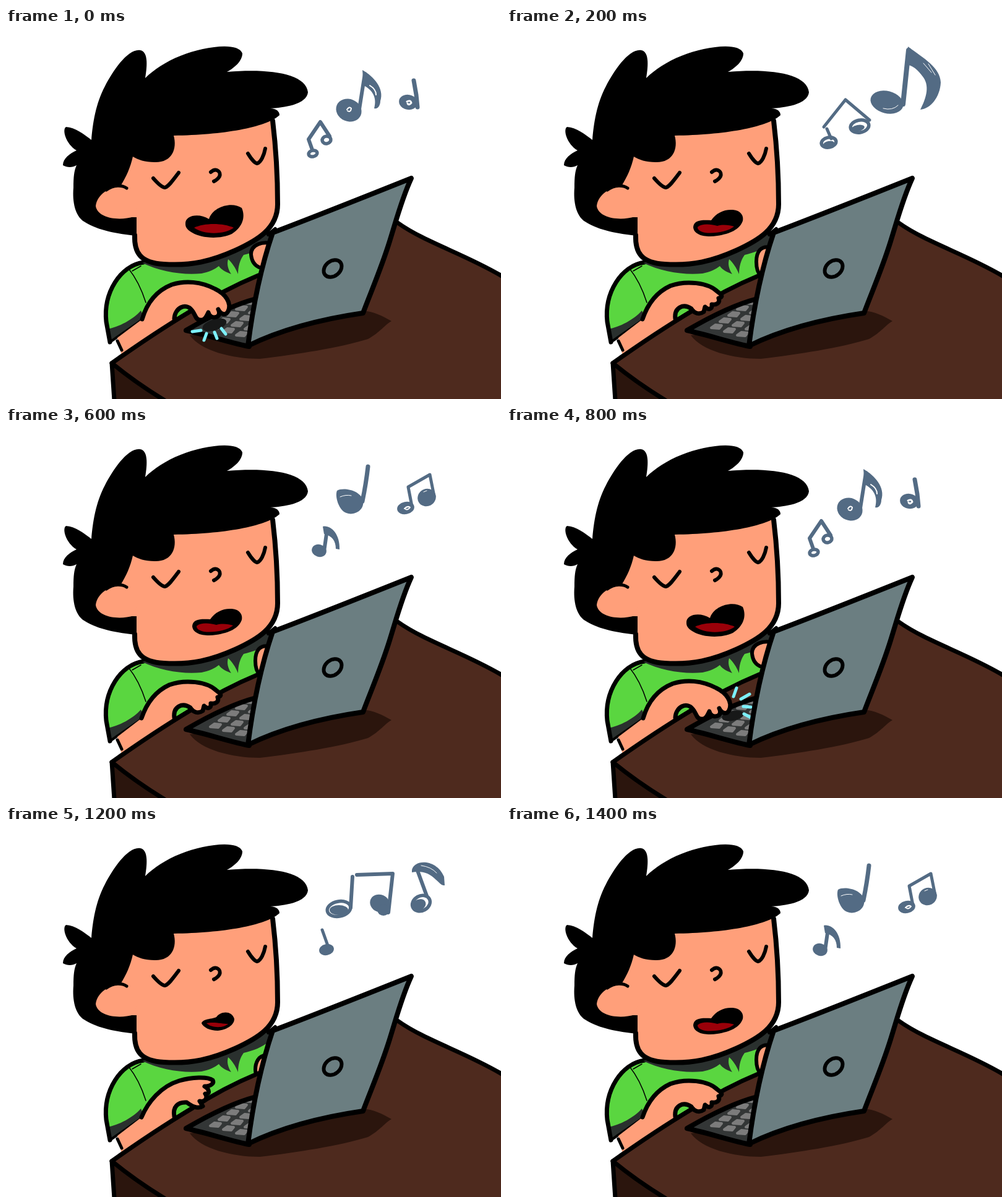
Animation, 800 px wide and 600 px high, one loop 1.6 s. Source, as an HTML page with a canvas:

```html
<!DOCTYPE html>
<html lang="en">
<head>
<meta charset="utf-8">
<title>Typing along to a tune</title>
<style>
html, body { margin: 0; width: 100%; height: 100%; overflow: hidden; background: #fff; }
canvas { display: block; width: 800px; height: 600px; }
</style>
</head>
<body>
<canvas id="stage" width="800" height="600"></canvas>
<script>
const ctx = document.getElementById('stage').getContext('2d');
const STEP = 200, STEPS = 8;
const INK = '#000', SKIN = '#ff9f7a', GREEN = '#5ad640', CLOTH = '#2a302e';
const WOOD = '#4e2a1e', SHADE = '#2b150d', STEEL = '#6b7e81', KEY = '#7c7c7c';
const RED = '#9a0009', NOTE = '#536b84', SPARK = '#7cf0fa';
const DESK_EDGE = 'M171 542Q240 493 300 457';

ctx.lineCap = ctx.lineJoin = 'round';

function fill(d, color) {
  ctx.fillStyle = color;
  ctx.fill(new Path2D(d));
}

function line(d, width = 7, color = INK) {
  ctx.strokeStyle = color;
  ctx.lineWidth = width;
  ctx.stroke(new Path2D(d));
}

function oval(x, y, rx, ry, turn, color, width) {
  ctx.beginPath();
  ctx.ellipse(x, y, rx, ry, turn, 0, Math.PI * 2);
  ctx.fillStyle = ctx.strokeStyle = color;
  ctx.lineWidth = width || 1;
  width ? ctx.stroke() : ctx.fill();
}

const pen = (d, width = 6) => line(d, width, NOTE);
const dot = (x, y, rx, ry, turn = -0.2) => oval(x, y, rx, ry, turn, NOTE);
const ring = (x, y, rx, ry, turn = -0.2) => oval(x, y, rx, ry, turn, NOTE, 5.5);
const glint = (d, width = 2) => line(d, width, '#fff');

const tunes = [
  () => {
    ring(496, 203, 7, 5);
    ring(518, 181, 7, 6);
    pen('M495 197L489 180L508 152L523 175');
    dot(554, 133, 21, 18, 0.4);
    glint('M551 132Q555 126 558 130Q557 137 552 134');
    pen('M571 131L580 74');
    fill('M576 68C594 78 612 98 605 118C605 125 601 132 595 130C600 112 592 100 578 93Z', NOTE);
    glint('M588 93Q598 99 598 108');
    dot(650, 120, 15, 12, 0.2);
    glint('M648 119Q654 116 655 121Q651 126 649 122', 3);
    pen('M665 128L663 108L659 85', 7);
  },
  () => {
    ring(520, 185, 12, 8);
    dot(520, 187, 9, 4);
    ring(570, 159, 15, 10);
    dot(567, 162, 11, 5);
    pen('M524 179L517 163M512 160L547 116L586 149', 5);
    dot(614, 120, 27, 18, 0.25);
    glint('M608 130Q623 134 632 125', 1);
    pen('M640 123Q645 75 649 36', 8);
    fill('M648 30C675 50 700 64 701 88C700 112 684 131 668 132C676 116 684 96 673 80C664 67 655 60 645 59Z', NOTE);
    glint('M673 57L686 72M681 58L692 76', 1);
  },
  () => {
    ring(538, 134, 19, 12);
    dot(538, 136, 15, 8, 0);
    pen('M557 132L560 82M567 79L625 77L618 140');
    dot(604, 125, 16, 14, 0.4);
    dot(610, 136, 10, 9, 0);
    ring(671, 125, 15, 12, -0.5);
    dot(667, 128, 12, 9, -0.5);
    pen('M680 113L665 72');
    fill('M656 71C660 53 696 53 708 82L709 96C704 97 700 91 695 87C684 75 670 72 656 75Z', NOTE);
    glint('M671 64Q687 66 696 76', 1);
    dot(518, 200, 12, 9);
    pen('M521 196L511 168', 5);
  },
  () => {
    fill('M535 103C545 97 573 102 577 119C580 135 562 144 550 139C538 135 531 112 535 103Z', NOTE);
    pen('M576 120Q582 91 585 64', 7);
    glint('M540 113Q549 109 558 111', 1);
    dot(506, 200, 12, 10, 0.3);
    pen('M514 201L519 166');
    fill('M512 161C524 158 540 172 539 198L533 197C533 184 527 176 514 173Z', NOTE);
    dot(646, 131, 14, 10);
    glint('M644 132Q649 127 653 130Q649 135 646 133', 2);
    pen('M656 128L650 97L685 77L692 112', 5);
    dot(680, 114, 15, 14, -0.5);
    glint('M675 105L680 103', 1);
  }
];

const mouths = [
  ['M290 317C289 302 313 299 328 309C334 289 365 280 381 291C388 307 381 323 365 333C343 343 314 339 301 331C294 327 290 323 290 317Z',
   'M304 323C320 315 351 315 368 323C354 334 320 335 304 323Z'],
  ['M301 322C302 311 313 310 330 311C338 299 351 293 365 294C378 295 383 304 381 312C376 326 360 333 340 336C323 339 302 336 301 322Z',
   'M308 322C315 316 328 317 340 320C350 317 360 319 367 321C358 329 335 333 320 331C311 329 308 326 308 322Z'],
  ['M316 319C319 311 331 313 340 309C347 299 365 298 369 312C369 322 356 330 342 331C330 331 319 326 316 319Z',
   'M324 319C335 316 350 320 359 320C350 328 331 326 324 319Z']
];

// Hand edge from the wrist gap, around the fingers, back to the cuff.
const hands = [
  'C273 452 291 444 300 456C306 462 306 472 313 472C321 474 324 466 327 460C329 468 335 469 341 467C346 464 345 459 343 455C347 463 355 466 359 458C365 445 355 430 338 422C315 410 290 408 268 415C240 426 227 447 220 471',
  'C270 452 285 445 298 454C303 462 311 464 318 459L320 451C325 456 332 456 331 447C338 448 345 445 342 437C350 435 347 431 341 427C325 411 289 408 264 417C240 428 226 450 219 471',
  'C269 454 278 446 292 447C299 452 309 459 318 453L313 445C321 447 327 440 322 433C330 435 329 425 321 421C331 421 337 416 334 411C326 405 300 406 280 412C250 421 229 447 219 471'
];

const farHands = [
  'M431 349C415 344 396 350 396 366C397 378 402 385 412 388',
  'M427 355C410 351 403 362 403 378C403 390 405 396 410 400',
  'M420 371C408 371 403 383 403 394C403 402 406 406 409 408'
];

const sparks = [
  'M301 491L315 489M324 494L320 505M337 492L341 502M348 486L355 495',
  'M371 422L366 436M392 432L378 440M382 452L394 453M383 464L396 471'
];

function drawShirt(pose) {
  fill('M222 379C185 384 157 428 162 475L168 508L222 471L270 482L425 405L432 330Z', GREEN);
  fill('M163 487C182 484 206 471 218 457L224 471L168 508Z', CLOTH);
  line('M222 379C185 384 157 428 162 475L168 508', 7);
  line('M168 508L220 472', 4);
  line('M198 389C210 404 220 425 226 444M204 393L218 385', 1.5);
  fill('M220 380C250 394 285 400 316 397C327 395 338 390 344 385C348 391 356 395 364 398C358 389 357 381 359 374C365 379 371 388 375 398C375 386 378 375 384 367C400 363 414 358 424 349L432 327L370 345Z', CLOTH);
  line('M435 325L424 334', 6);
  fill(farHands[pose] + 'L430 390Z', SKIN);
  line(farHands[pose], 6);
}

function drawHead() {
  const jaw = 'M431 150C437 200 439 240 439 285C439 325 405 344 370 360C332 377 300 385 255 382C216 380 207 362 208 335';
  fill(jaw + 'L204 306L182 260L205 165Z', SKIN);
  line(jaw, 8);
  fill('M442 141C420 161 350 173 271 174C277 196 268 218 240 217C225 217 213 213 205 208C201 226 194 241 186 254L186 306L211 306L211 336' +
    'C180 333 150 328 126 313C112 304 107 282 109 258C109 241 110 231 114 222C107 226 99 226 92 222C92 211 103 203 114 198C97 188 90 164 97 160' +
    'C112 161 125 171 138 181C140 155 145 122 160 94C173 69 197 33 217 36C229 38 229 58 225 81C238 68 259 54 282 45C320 30 375 22 382 41' +
    'C382 53 370 64 357 71C427 65 485 74 488 104C486 124 448 129 427 130C437 130 442 135 442 141Z', INK);
  fill('M198 258C180 250 147 265 145 288C148 307 181 313 207 305L214 280Z', SKIN);
  line('M162 262C174 253 188 254 195 259', 5);
  line('M238 243C245 251 252 258 257 258C263 256 270 246 279 234M391 203C397 213 403 219 406 219C412 217 417 206 419 195', 6);
  line('M331 233C340 225 348 233 345 240C343 244 340 246 336 248', 6);
}

function drawMouth([lips, tongue]) {
  fill(lips, INK);
  fill(tongue, RED);
}

function drawDesk() {
  const left = DESK_EDGE + 'Q350 424 408 400';
  const right = 'C678 347 740 365 801 401';
  fill(left + 'L633 315' + right + 'L800 600L176 600Z', WOOD);
  fill('M171 542Q210 574 256 600L176 600Z', SHADE);
  line(left + 'M171 542L175 602M171 542Q210 574 256 602M633 315' + right, 7);
  fill('M297 497C315 522 365 535 410 535C470 528 540 517 585 503C605 492 612 480 623 474C608 466 595 458 575 457Z', SHADE);
}

function drawKeyboard(press) {
  const base = 'M291 489C320 472 365 448 404 438L393 515C370 511 330 498 291 489Z';
  fill(base, '#333636');
  ctx.save();
  ctx.clip(new Path2D(base));
  for (let row = 0; row < 5; row++) {
    for (let col = 0; col < 4; col++) {
      ctx.save();
      ctx.translate(339 + col * 21 + row * 14, 483 + col * 6 - row * 10);
      fill('M-9 2L-2 -3L8 -2L4 3Z', KEY);
      line('M-9 2L-2 -3L8 -2L4 3Z', 4, KEY);
      ctx.restore();
    }
  }
  if (press === 0) oval(337, 480, 20, 9, -0.3, '#171818');
  if (press === 1) oval(365, 467, 18, 8, -0.2, '#171818');
  ctx.restore();
  line(base, 8);
}

function drawArm(pose) {
  const edge = 'M272 470' + hands[pose];
  fill(edge + 'L180 501L187 531L272 474Z', SKIN);
  line(edge, 7);
  line('M180 506L187 521', 5);
  line(DESK_EDGE, 7);
}

function drawScreen() {
  const lid = 'M431 331C510 301 580 273 655 243C640 275 631 310 620 345C606 390 590 426 577 461C515 470 450 485 391 514C399 450 411 390 431 331Z';
  fill(lid, STEEL);
  line(lid, 8);
  oval(528, 389, 16, 12, -0.7, INK, 6);
}

function draw(step) {
  const beat = step % 4;
  const pose = [0, 1, 2, 1][beat];
  const press = beat ? -1 : step >> 2;
  ctx.fillStyle = '#fff';
  ctx.fillRect(0, 0, 800, 600);
  drawShirt(pose);
  drawHead();
  drawMouth(mouths[pose]);
  drawDesk();
  drawKeyboard(press);
  drawArm(pose);
  if (press >= 0) line(sparks[press], 5, SPARK);
  drawScreen();
  tunes[beat]();
}

let shown = -1;
const start = performance.now();
function tick() {
  const step = Math.floor((performance.now() - start) / STEP) % STEPS;
  if (step !== shown) draw(shown = step);
  requestAnimationFrame(tick);
}
tick();
</script>
</body>
</html>
```
